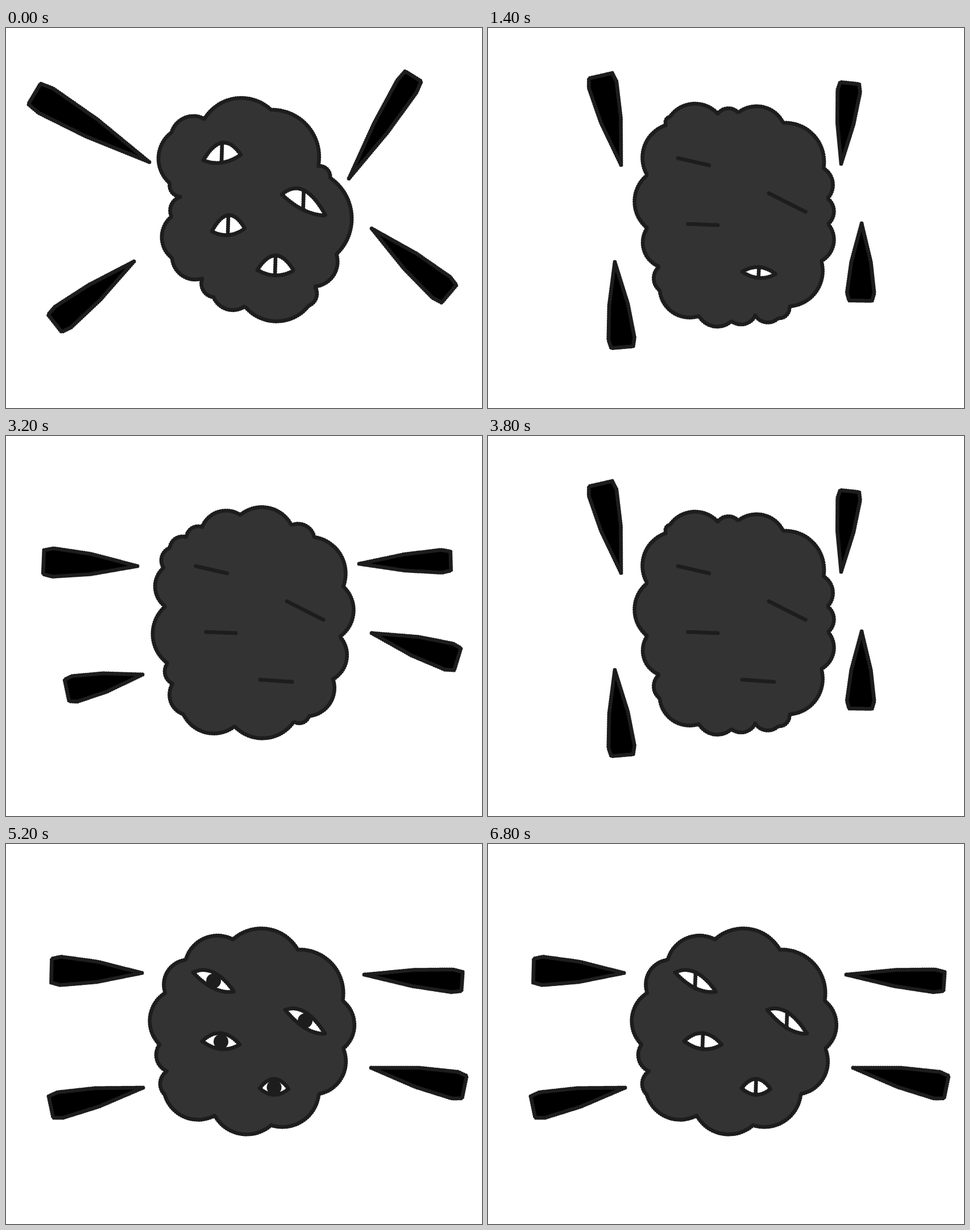
Animation of 837 by 669 pixels, one loop 7 s. Source, as an HTML page:

```html
<!DOCTYPE html>
<html lang="en">
<head>
<meta charset="utf-8">
<title>Many-eyed blob</title>
<style>
html, body { margin: 0; width: 100%; height: 100%; overflow: hidden; background: #fff; }
svg { display: block; }
path { fill: none; stroke: #1d1d1d; stroke-width: 7; stroke-linecap: round; stroke-linejoin: round; stroke-dasharray: 0 4; }
.body { fill: #333; }
.limb { fill: #000; }
.lid { fill: #fff; }
circle { fill: #1d1d1d; }
</style>
</head>
<body>
<svg id="stage" width="837" height="669" viewBox="0 0 837 669"></svg>
<script>
const STEP = 200;
const BULGE = 0.24;                    // lobe height relative to its width
const FOOT_WIDTHS = [50, 40, 48, 46];
const PUPIL = 13;

// body: the notches between its lobes; tips and feet: both ends of the four limbs
const poses = {
  A: {
    body: '349,160 466,144 549,243 570,264 581,398 543,455 532,489 420,490 365,474 345,441 292,405 291,332 308,297 288,273 291,184',
    tips: '252,236 603,265 643,353 225,411',
    feet: '50,116 716,85 779,468 86,520'
  },
  B: {
    body: '320,156 404,151 440,149 519,167 590,247 597,300 598,345 586,410 530,490 510,511 470,506 428,516 371,507 302,462 301,420 280,352 280,259 313,171',
    tips: '234,241 621,239 657,344 223,412',
    feet: '198,84 636,97 655,480 236,562'
  },
  C: {
    body: '314,181 352,178 472,175 563,238 601,335 596,378 571,403 537,478 514,507 455,503 395,508 349,480 318,455 281,428 291,388 285,344 284,252',
    tips: '239,207 632,229 642,405 230,423',
    feet: '78,132 738,91 729,535 113,525'
  },
  D: {
    body: '345,160 412,139 502,157 542,178 593,265 587,353 575,428 533,493 506,503 402,511 312,490 293,436 284,400 280,300 277,232 288,197 317,178',
    tips: '231,229 621,225 643,347 240,420',
    feet: '66,222 782,220 794,393 107,448'
  },
  E: {
    body: '330,176 400,174 513,196 542,217 560,225 586,288 586,376 573,386 567,412 572,440 529,470 504,504 437,495 345,473 320,457 290,435 292,380 285,315 292,246 285,205',
    tips: '239,210 636,220 640,405 241,434',
    feet: '60,192 779,174 771,497 93,473'
  },
  F: {
    body: '399,168 513,186 592,276 593,360 550,440 466,495 367,478 279,441 283,400 270,353 280,262 316,204',
    tips: '239,227 630,230 642,394 241,429',
    feet: '80,223 802,242 806,428 79,463'
  }
};
poses.V = { ...poses.B, feet: '212,47 635,46 660,560 237,576' };

// Eye corners in left, right pairs; lids rise and drop from the line between them.
const awake = {
  corners: '329,226 401,260 491,292 561,334 345,347 411,353 446,430 497,431',
  rise: 17, drop: 11, shut: 0
};
const asleep = {
  corners: '334,229 390,242 494,291 559,324 352,345 404,347 447,429 506,433',
  rise: 10, drop: 9, shut: 4
};
const looks = {
  wide: { ...awake, corners: '347,233 413,223 485,293 562,330 362,358 420,353 442,426 506,427', rise: 26, drop: 9 },
  dozing: { ...asleep, shut: 3 },
  asleep,
  round: { ...awake, round: true },
  slit: awake
};

const poseOrder = 'AVDBAVDBDVDBCVEBDVDBCVEBFVFBFVFBAVF';

function lookAt(i) {
  if (i < 7) return looks.wide;
  if (i === 7) return looks.dozing;
  if (i < 24) return looks.asleep;
  if (i < 30) return looks.round;
  return poseOrder[i] === 'A' ? looks.wide : looks.slit;
}

const points = text => text.split(' ').map(p => p.split(',').map(Number));
const distance = ([ax, ay], [bx, by]) => Math.hypot(bx - ax, by - ay);
const path = (d, kind = '') => `<path class="${kind}" d="${d}"/>`;

// A ring of round lobes, one arc from notch to notch.
function blob(text) {
  const notches = points(text);
  const arcs = notches.map((p, i) => {
    const next = notches[(i + 1) % notches.length];
    const r = distance(p, next) * (0.25 + BULGE * BULGE) / (2 * BULGE);
    return `A${r},${r} 0 0 1 ${next}`;
  });
  return path(`M${notches[0]}${arcs.join('')}Z`, 'body');
}

// A limb that widens from its tip to its foot.
function limb(tip, foot, width) {
  const length = distance(tip, foot);
  const [ux, uy] = [(foot[0] - tip[0]) / length, (foot[1] - tip[1]) / length];
  const at = (along, side) => [
    tip[0] + ux * along * length - uy * side * width,
    tip[1] + uy * along * length + ux * side * width
  ];
  const outline = [tip, at(0.5, 0.36), at(0.9, 0.5), at(1, 0.42), at(1, -0.42), at(0.9, -0.5), at(0.5, -0.36)];
  return path(`M${outline.join('L')}Z`, 'limb');
}

function eye(left, right, { rise, drop, round }, shut) {
  if (shut) return path(`M${left}L${right}`);
  const x = (left[0] + right[0]) / 2, y = (left[1] + right[1]) / 2;
  const lid = path(`M${left}Q${x},${y - 2 * rise} ${right}Q${x},${y + 2 * drop} ${left}Z`, 'lid');
  const pupil = round
    ? `<circle cx="${x}" cy="${y - 2}" r="${PUPIL}"/>`
    : path(`M${x},${y - rise}L${x - 1},${y + drop}`);
  return lid + pupil;
}

function picture(i) {
  const pose = poses[poseOrder[i]], look = lookAt(i);
  const tips = points(pose.tips), feet = points(pose.feet), corners = points(look.corners);
  const limbs = tips.map((tip, k) => limb(tip, feet[k], FOOT_WIDTHS[k]));
  const eyes = tips.map((_, k) => eye(corners[2 * k], corners[2 * k + 1], look, k < look.shut));
  return [...limbs, blob(pose.body), ...eyes].join('');
}

const stage = document.getElementById('stage');
let shown = -1;
function draw(now) {
  const i = Math.floor(now / STEP) % poseOrder.length;
  if (i !== shown) stage.innerHTML = picture(shown = i);
  requestAnimationFrame(draw);
}
draw(0);
</script>
</body>
</html>
```
